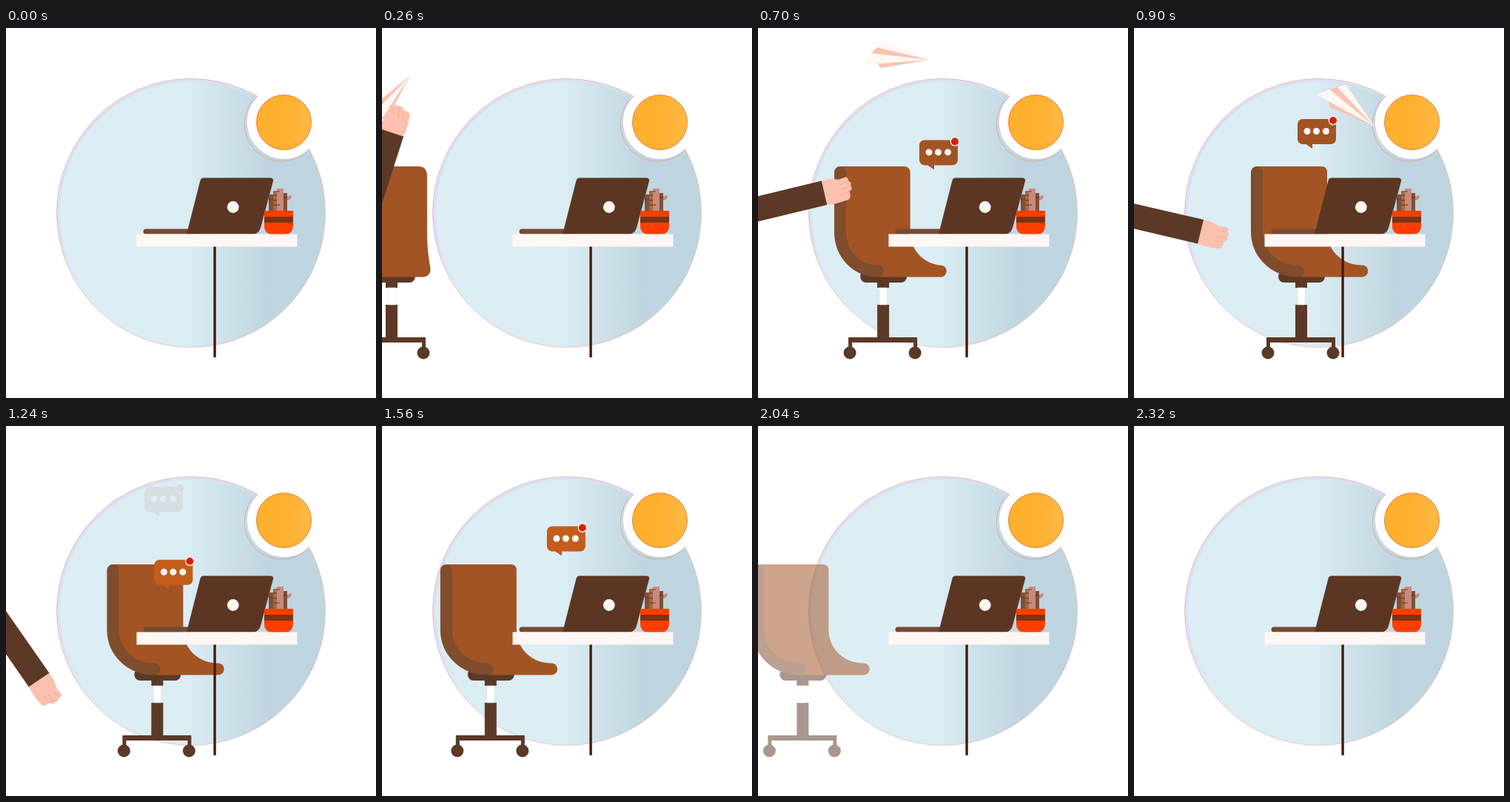
Animation of 500x500 px, one loop 3 s. Source, as an HTML page:

```html
<!DOCTYPE html>
<html lang="en">
<head>
<meta charset="utf-8">
<title>Desk scene</title>
<style>
  html, body { margin: 0; width: 100%; height: 100%; overflow: hidden; background: #fff; }
  svg { display: block; width: 100vw; height: 100vh; }
</style>
</head>
<body>
<svg viewBox="0 0 500 500">
  <defs>
    <linearGradient id="sky">
      <stop offset=".5" stop-color="#dcedf4"/>
      <stop offset=".51" stop-color="#d8eaf2"/>
      <stop offset=".77" stop-color="#c2d7e2"/>
      <stop offset=".79" stop-color="#bfd5e0"/>
    </linearGradient>
    <linearGradient id="glow">
      <stop offset=".5" stop-color="#ffb02e"/>
      <stop offset="1" stop-color="#fdb944"/>
    </linearGradient>
    <linearGradient id="rim" x2="1" y2="1">
      <stop offset=".3" stop-color="#dcdff3"/>
      <stop offset=".45" stop-color="#dcdff3" stop-opacity="0"/>
    </linearGradient>
    <g id="bubble">
      <rect x="-48" y="-2" width="52" height="34" rx="7"/>
      <path d="M-38 31L-28 38V31Z"/>
      <g fill="#fff7f3">
        <circle cx="-35" cy="14.5" r="4.5"/>
        <circle cx="-22.5" cy="14.5" r="4.5"/>
        <circle cx="-9.5" cy="14.5" r="4.5"/>
      </g>
      <circle r="5.7" fill="#d8200c" stroke="#fff7f3" stroke-width="1.3"/>
    </g>
  </defs>

  <circle cx="250" cy="250" r="181.5" fill="url(#sky)"/>
  <circle cx="250" cy="250" r="179.5" fill="none" stroke="url(#rim)" stroke-width="4"/>
  <circle cx="250" cy="250" r="181.6" fill="none" stroke="#e59a8c" stroke-width=".7" opacity=".7"/>
  <circle cx="376" cy="127" r="50" fill="#fff"/>
  <path d="M340 92A50 50 0 1 0 410 163" fill="none" stroke="#e59a8c" stroke-width=".8"/>
  <circle cx="375.5" cy="127.5" r="37" fill="url(#glow)" stroke="#e8622e" stroke-width=".8"/>

  <g id="chair">
    <g fill="#5b3926">
      <rect x="-31" y="328" width="63" height="16" rx="8"/>
      <path d="M-8 342H8V351H-8ZM-8 374H8V418H46V432H41V425H-42V432H-47V418H-8Z"/>
      <circle cx="-45" cy="439" r="8.5"/>
      <circle cx="43" cy="439" r="8.5"/>
    </g>
    <path d="M-5 351H5V374H-5Z" fill="#fff" stroke="#e2e2e2" stroke-width=".6"/>
    <path id="seat" fill="#a35424"/>
    <path id="spine" fill="none" stroke="#7f4c2c" stroke-width="16" stroke-linecap="round"/>
  </g>

  <rect x="280.4" y="295" width="3.4" height="150" fill="#4a1a05"/>
  <path d="M250 271.5H189Q185.500 271.500 185.500 275Q185.500 278.500 189 278.500H250Z" fill="#764a35"/>
  <path d="M267 202.500H357Q362 202.500 361 207L344 270Q341.500 278.500 334 278.500H244L262.500 206Q263.500 202.500 267 202.500Z" fill="#5b3723"/>
  <circle cx="306.800" cy="242" r="7.900" fill="#fff7f3"/>

  <path d="M355 225H361V247H355ZM375 223H380V247H375Z" fill="#80503a"/>
  <path d="M361 220H366V247H361Z" fill="#a8683f"/>
  <path d="M366 217H375V247H366ZM380 228L386 225.500Q386 233 380 233Z" fill="#c98a7e"/>
  <path d="M355 232H361M361 226H366M361 233H366M361 239H366M366 221H370M366 239H370M375 229H380" stroke="#5b3723" stroke-width="1"/>
  <path d="M349 247H388V267Q388 279 376 279H361Q349 279 349 267Z" fill="#ff3d00"/>
  <path d="M349 255H388V263H349Z" fill="#7a3410"/>
  <rect x="176.500" y="278.500" width="217" height="17" fill="#fff7f3"/>

  <use id="note1" href="#bubble" fill="#a35424"/>
  <use id="note2" href="#bubble" fill="#c45c1a"/>

  <g id="plane">
    <path d="M-79 2L-72.500 -7L0 0L-63 20L-70 14Z" fill="#f7c4b3"/>
    <path d="M-87 19L-79 2L0 0ZM-72.500 -7L-66 -17L0 0Z" fill="#fff7f3"/>
  </g>
  <g id="arm">
    <path d="M92 259L103 261Q112 265 115 268L125 269Q129 272 126 275Q130 279 126 283Q128 288 121 289Q121 296 116 298Q100 297 85 291Z" fill="#fbc0ae"/>
    <path d="M114 275H126M112 282L126 283M109 288L121 289" fill="none" stroke="#f0a897" stroke-width=".8"/>
    <path d="M-40 228L94 259L86 291.500L-40 262Z" fill="#5b3926"/>
  </g>
</svg>
<script>
const LOOP = 3000, STEP = 20;
const SHOULDER = { x: -21, y: 250 };
const REACH = 194.6;      // shoulder to plane nose
const RELEASE = 480;
const NOTE_GAP = 748;

const el = id => document.getElementById(id);
const clamp = v => Math.max(0, Math.min(1, v));

// Piecewise linear value through [time, value] keys
function linear(t, keys) {
  if (t <= keys[0][0]) return keys[0][1];
  for (let i = 1; i < keys.length; i++) {
    const [a, u] = keys[i - 1], [b, v] = keys[i];
    if (t <= b) return u + (v - u) * (t - a) / (b - a);
  }
  return keys[keys.length - 1][1];
}

// Smooth value through the same kind of keys (cubic Hermite)
function smooth(t, keys) {
  const n = keys.length - 1;
  if (t <= keys[0][0] || t >= keys[n][0]) return linear(t, keys);
  let i = 0;
  while (t > keys[i + 1][0]) i++;
  const slope = k => {
    const p = keys[Math.max(0, k - 1)], q = keys[Math.min(n, k + 1)];
    return (q[1] - p[1]) / (q[0] - p[0]);
  };
  const [a, u] = keys[i], [b, v] = keys[i + 1], h = b - a, s = (t - a) / h;
  const s2 = s * s, s3 = s2 * s;
  return (2 * s3 - 3 * s2 + 1) * u + (s3 - 2 * s2 + s) * h * slope(i)
    + (3 * s2 - 2 * s3) * v + (s3 - s2) * h * slope(i + 1);
}

// Blend two paths with the same commands
function blend(from, to, p) {
  const num = /-?\d+(\.\d+)?/g, ends = to.match(num);
  let i = 0;
  return from.replace(num, a => (+a + (ends[i++] - a) * p).toFixed(2));
}

const SEAT = {
  back: "M-52 195Q-52 187 -44 187L36 187Q48 187 48 200L48 275C48 298 50 308 52 322C54 330 50 336.5 42 336.5L-36 336.5C-48 336 -50 310 -52 275Z",
  side: "M-60 195Q-60 187 -58 187L27 187Q35 187 35 195L35 275C35 300 55 320.5 82 320.5C93 320.5 93 336.5 82 336.5L0 336.5C-36 334 -60 310 -60 275Z"
};
const SPINE = {
  back: "M-44 195L-44 275C-44 305 -42 328 -30 328",
  side: "M-60 195L-60 275C-60 305 -36 328.5 -4 328.5"
};

const CHAIR_X = [[60, -58], [480, 91], [860, 226], [1120, 226], [2320, 10]];
const CHAIR_FADE = [[1880, 1], [2180, .1], [2320, 0]];
const ARM = [[60, -99], [480, -43], [900, 13], [1240, 55], [1540, 92]];
const NOTE_X = [[260, 233], [480, 247.5], [580, 256], [700, 266], [820, 271], [900, 269], [1050, 256], [1240, 235], [1290, 230]];
const NOTE_Y = [[260, 216], [480, 184.5], [900, 125], [1050, 103], [1240, 84], [1290, 79]];
const NOTE_FADE = [[260, 0], [420, 1], [930, 1], [1240, .09], [1270, 0]];
const PLANE_X = [[480, 121], [580, 172], [660, 212], [740, 251], [820, 289], [900, 325], [1060, 398]];
const PLANE_Y = [[480, 117], [580, 68], [660, 40], [740, 54], [820, 89], [900, 133], [1060, 195]];
const PLANE_TILT = [[480, -15], [580, -28], [660, -5], [740, 20], [820, 34], [900, 41], [1060, 28]];
const PLANE_FADE = [[930, 1], [1060, 0]];

function place(node, x, y, tilt, alpha) {
  node.setAttribute("transform", `translate(${x} ${y}) rotate(${tilt})`);
  node.setAttribute("opacity", alpha);
}

function drawChair(t) {
  const s = clamp((t - RELEASE) / 280), p = s * s * (3 - 2 * s);
  place(el("chair"), linear(t, CHAIR_X), 0, 0, t < 60 ? 0 : linear(t, CHAIR_FADE));
  el("seat").setAttribute("d", blend(SEAT.back, SEAT.side, p));
  el("spine").setAttribute("d", blend(SPINE.back, SPINE.side, p));
  el("spine").setAttribute("opacity", clamp(p * 2));
}

function drawNote(id, t) {
  place(el(id), smooth(t, NOTE_X), smooth(t, NOTE_Y), 0, linear(t, NOTE_FADE));
}

function drawArm(t) {
  const angle = linear(t, ARM), rad = angle * Math.PI / 180;
  el("arm").setAttribute("transform", `rotate(${angle - 13} ${SHOULDER.x} ${SHOULDER.y})`);
  el("arm").setAttribute("opacity", t < 60 || t > 1540 ? 0 : 1);
  if (t < RELEASE) {
    place(el("plane"), SHOULDER.x + REACH * Math.cos(rad), SHOULDER.y + REACH * Math.sin(rad),
      angle + 28, t < 60 ? 0 : 1);
  } else {
    place(el("plane"), smooth(t, PLANE_X), smooth(t, PLANE_Y), smooth(t, PLANE_TILT), linear(t, PLANE_FADE));
  }
}

function draw(now) {
  const t = Math.floor(now % LOOP / STEP) * STEP;
  drawChair(t);
  drawNote("note1", t);
  drawNote("note2", t - NOTE_GAP);
  drawArm(t);
}

let start;
function tick(now) {
  start ??= now;
  draw(now - start);
  requestAnimationFrame(tick);
}
draw(0);
requestAnimationFrame(tick);
</script>
</body>
</html>
```
